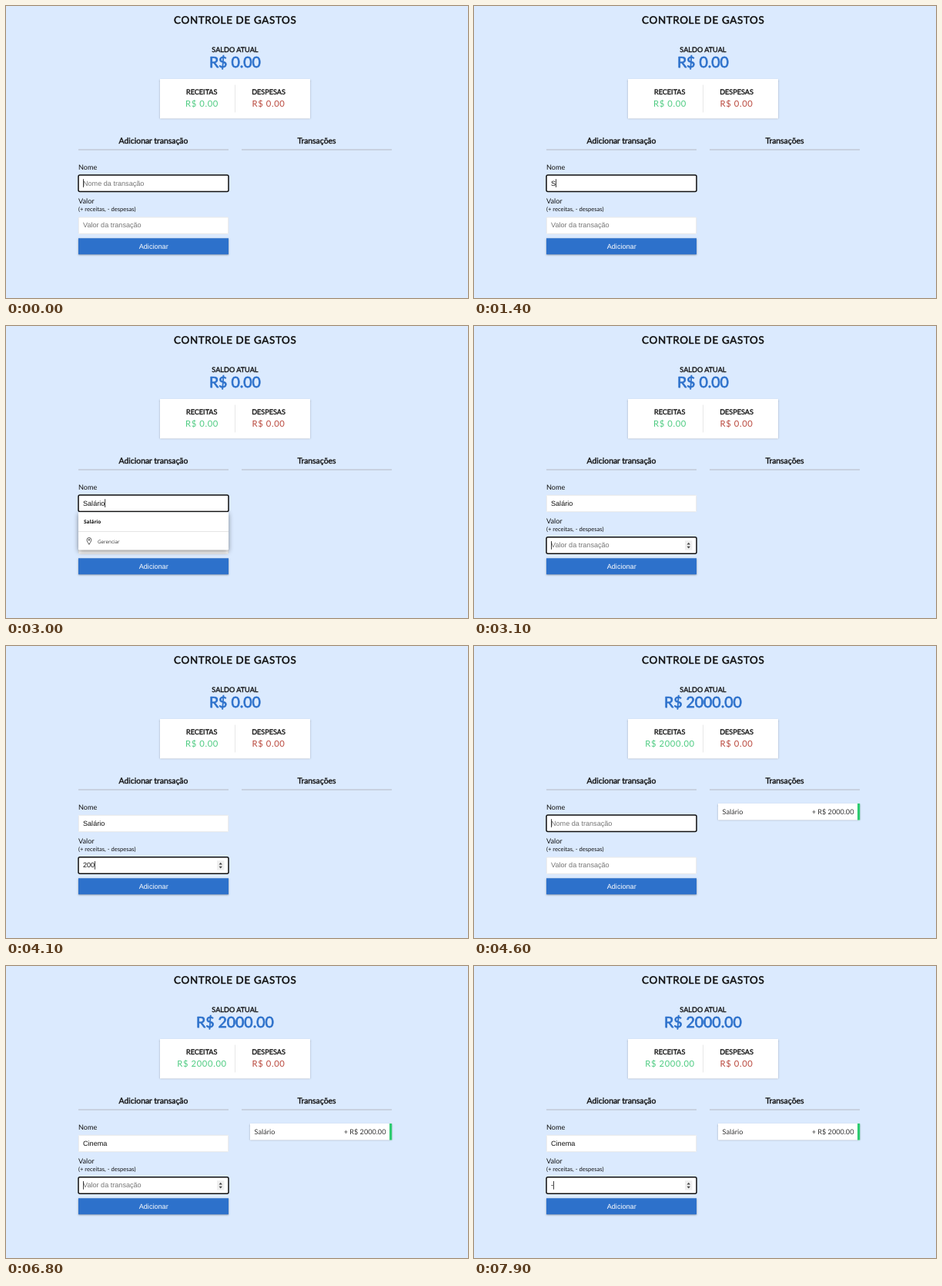
An HTML page with a canvas for the animation above (8 s loop, 600x380 px).

```html
<!DOCTYPE html>
<html lang="pt-BR">
<head>
<meta charset="utf-8">
<title>Controle de gastos</title>
<style>
  html, body { margin: 0; width: 100%; height: 100%; overflow: hidden; background: #dbeafe; }
  canvas { display: block; }
</style>
</head>
<body>
<canvas id="stage" width="600" height="380"></canvas>
<script>
const ctx = document.getElementById('stage').getContext('2d');
const LOOP = 8000;
const BLINK = 500;
const SUBMIT = 4500;
const POPUP = [1500, 3100];
const LATO = 'Lato, sans-serif';
const ARIAL = '"Liberation Sans", Arial, sans-serif';
const POPUP_FONT = '"Open Sans", sans-serif';
const BLUE = '#2d71cb';

// Each entry: time, focused field, its text from then on
const keys = [
  [0, 'name', ''], [1400, 'name', 'S'], [1800, 'name', 'Sa'], [2000, 'name', 'Sal'],
  [2300, 'name', 'Salá'], [2600, 'name', 'Salár'], [2800, 'name', 'Salári'], [2900, 'name', 'Salário'],
  [3100, 'value', ''], [3600, 'value', '2'], [3900, 'value', '20'], [4100, 'value', '200'],
  [4200, 'value', '2000'], [SUBMIT, 'name', ''], [5400, 'name', 'C'], [5600, 'name', 'Ci'],
  [5900, 'name', 'Cin'], [6000, 'name', 'Cine'], [6100, 'name', 'Cinem'], [6400, 'name', 'Cinema'],
  [6800, 'value', ''], [7600, 'value', '-']
];

function stateAt(time) {
  const state = { name: '', value: '' };
  for (const [at, field, text] of keys) {
    if (at > time) break;
    if (at === SUBMIT) state.value = '';
    state[field] = text;
    state.focus = field;
    state.caret = (time - at) % (2 * BLINK) < BLINK;
  }
  state.paid = time >= SUBMIT;
  state.popup = time >= POPUP[0] && time < POPUP[1];
  return state;
}

function write(str, x, y, size, opts = {}) {
  const { font = LATO, color = '#111', align = 'left', weight = 400, spacing = 0, heavy = false } = opts;
  ctx.font = `${weight} ${size}px ${font}`;
  ctx.letterSpacing = spacing + 'px';
  ctx.textAlign = 'left';
  ctx.fillStyle = color;
  const width = ctx.measureText(str).width;
  const left = align === 'center' ? x - width / 2 : align === 'right' ? x - width : x;
  ctx.fillText(str, left, y);
  if (heavy) {
    ctx.strokeStyle = color;
    ctx.lineWidth = size / 26;
    ctx.lineJoin = 'round';
    ctx.strokeText(str, left, y);
  }
  return left + width;
}

function box(x, y, w, h, fill, radius = 0) {
  ctx.fillStyle = fill;
  ctx.beginPath();
  ctx.roundRect(x, y, w, h, radius);
  ctx.fill();
}

function outline(x, y, w, h, color, width, radius) {
  ctx.strokeStyle = color;
  ctx.lineWidth = width;
  ctx.beginPath();
  ctx.roundRect(x, y, w, h, radius);
  ctx.stroke();
}

function raised(x, y, w, h, fill, radius = 0, blur = 2.2, alpha = 0.36, drop = 0.8) {
  ctx.save();
  ctx.shadowColor = `rgba(0,0,0,${alpha})`;
  ctx.shadowBlur = blur;
  ctx.shadowOffsetY = drop;
  box(x, y, w, h, fill, radius);
  ctx.restore();
}

function triangle(x, y, dir) {
  ctx.fillStyle = '#444';
  ctx.beginPath();
  ctx.moveTo(x - 2.2, y);
  ctx.lineTo(x + 2.2, y);
  ctx.lineTo(x, y + 2.7 * dir);
  ctx.fill();
}

function input(y, text, placeholder, focused, caret, spinner) {
  box(94, y, 195, 22, '#fff', 1.3);
  outline(94.3, y + 0.3, 194.4, 21.4, '#dedede', 0.65, 1.3);
  if (focused) outline(94, y, 195, 21.6, '#101010', 1.5, 2);
  const baseline = y + 13.6;
  const end = write(text, 100, baseline, 9.1, { font: ARIAL, color: '#111' });
  if (!text) write(placeholder, 100, baseline, 9.1, { font: ARIAL, color: '#757575' });
  if (focused && spinner) {
    box(274, y + 4.5, 9.5, 12.5, '#efefef');
    triangle(278.7, y + 9.7, -1);
    triangle(278.7, y + 12, 1);
  }
  if (focused && caret) box(end, y + 5.3, 0.8, 10.7, '#111');
}

function summary(paid) {
  const amount = paid ? 'R$ 2000.00' : 'R$ 0.00';
  const mid = { align: 'center' };
  const bold = { align: 'center', heavy: true };
  write('CONTROLE DE GASTOS', 297.7, 23.3, 13.4, { ...bold, spacing: 0.65 });
  write('SALDO ATUAL', 297.4, 60.3, 9.1, bold);
  write(amount, 297.4, 80.1, 19.5, { ...bold, color: BLUE });

  raised(200, 95, 195, 51.5, '#fff');
  box(297.2, 102.5, 0.7, 36, '#dedede');
  write('RECEITAS', 254.2, 115.1, 9.1, bold);
  write('DESPESAS', 341, 115.1, 9.1, bold);
  write(amount, 254.5, 130.5, 11.2, { ...mid, color: '#4ccb80', spacing: 0.65 });
  write('R$ 0.00', 341, 130.5, 11.2, { ...mid, color: '#b9473c', spacing: 0.65 });
}

function heading(label, x) {
  write(label, x + 97.5, 178.8, 10.4, { align: 'center', heavy: true });
  box(x, 186.6, 195, 0.8, '#b5bac3');
}

function form(s) {
  heading('Adicionar transação', 94);
  write('Nome', 94, 212.5, 9.1);
  input(220, s.name, 'Nome da transação', s.focus === 'name', s.caret, false);
  write('Valor', 94, 256.6, 9.1);
  write('(+ receitas, - despesas)', 94, 267, 7.58);
  input(274.7, s.value, 'Valor da transação', s.focus === 'value', s.caret, true);
  raised(94, 302.2, 195, 21, BLUE);
  write('Adicionar', 191.7, 315.5, 9.1, { font: ARIAL, color: '#fff', align: 'center' });
}

function transactions(paid) {
  heading('Transações', 306);
  if (!paid) return;
  raised(317, 205, 184, 21.5, '#fff');
  box(498, 205, 3.2, 21.5, '#2ecc71');
  write('Salário', 322.6, 219.1, 9.1, { color: '#333' });
  write('+ R$ 2000.00', 493.4, 219.1, 9.1, { color: '#333', align: 'right' });
}

function pin(x, y) {
  ctx.strokeStyle = '#444';
  ctx.lineWidth = 0.9;
  ctx.beginPath();
  ctx.moveTo(x, y + 6);
  ctx.bezierCurveTo(x - 1, y + 4, x - 2.8, y + 2.2, x - 2.8, y);
  ctx.arc(x, y, 2.8, Math.PI, 0);
  ctx.bezierCurveTo(x + 2.8, y + 2.2, x + 1, y + 4, x, y + 6);
  ctx.stroke();
  ctx.fillStyle = '#444';
  ctx.beginPath();
  ctx.arc(x, y, 1.1, 0, 2 * Math.PI);
  ctx.fill();
}

function suggestions() {
  raised(94, 242.3, 195, 49.3, '#fff', 1.3, 6, 0.45, 1.8);
  write('Salário', 101, 257, 6.5, { font: POPUP_FONT, weight: 700 });
  box(94, 267.2, 195, 0.8, '#dcdcdc');
  pin(107.9, 278.3);
  write('Gerenciar', 119, 282.6, 6.3, { font: POPUP_FONT, color: '#333' });
}

function draw(now) {
  const s = stateAt(now % LOOP);
  ctx.textRendering = 'geometricPrecision';
  box(0, 0, 600, 380, '#dbeafe');
  summary(s.paid);
  form(s);
  transactions(s.paid);
  if (s.popup) suggestions();
}

const start = performance.now();
function tick() {
  draw(performance.now() - start);
  requestAnimationFrame(tick);
}
tick();
</script>
</body>
</html>
```
